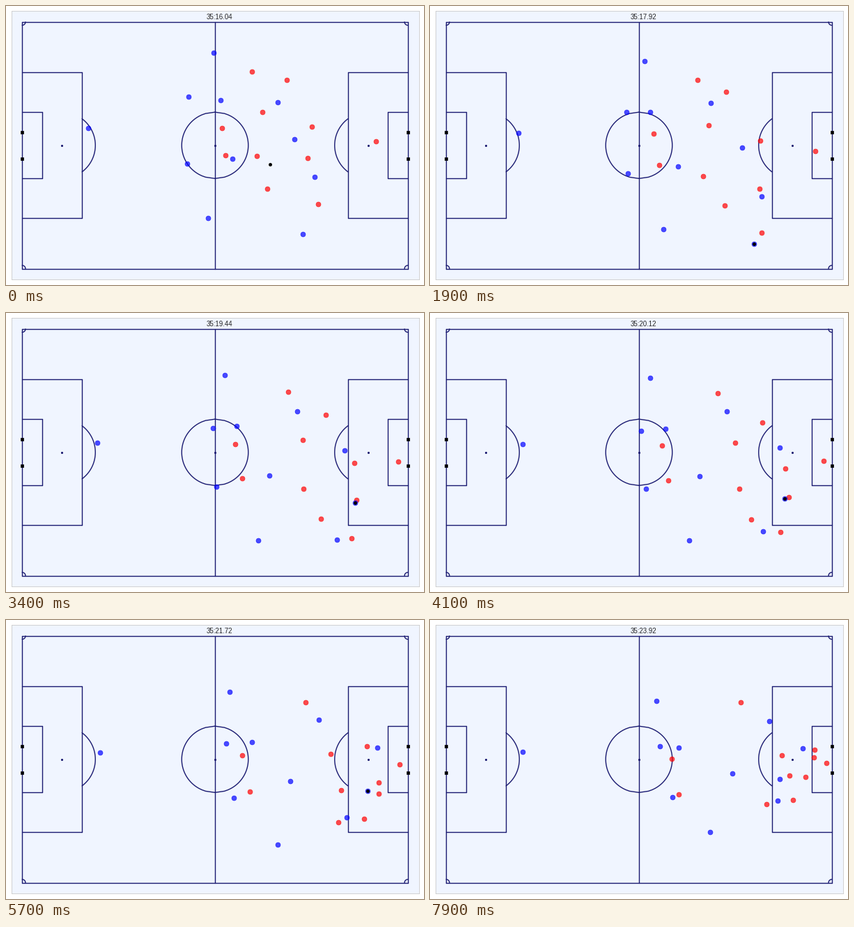
Write a matplotlib script that moves like this. It is 600 by 400 pixels and loops after 8 s.

```python
import numpy as np
import matplotlib.pyplot as plt
from matplotlib.animation import FuncAnimation

plt.rcParams["font.family"] = "Liberation Sans"
plt.rcParams["lines.solid_capstyle"] = "round"

W, H, DPI = 600, 400, 50
MARGIN, LIFT = 7.5, 0.25                      # pixels
HALF_L, HALF_W, BORDER = 53.0, 34.0, 3.0      # metres
SX = (W / 2 - MARGIN) / (HALF_L + BORDER)     # pixels per metre
SY = (H / 2 - MARGIN) / (HALF_W + BORDER)
CENTRE = np.array([W / 2 + 0.5, H / 2 + 0.25])
YARD = 0.9144
LINE, GRASS = "midnightblue", "#f0f5ff"

FRAMES, STEP_MS = 80, 100
RATE = 25                                     # tracking samples per second
START = 16.04                                 # seconds past minute 35
END = 7.88                                    # time of the last sample


# ---------- pitch ----------
fig = plt.figure(figsize=(W / DPI, H / DPI), dpi=DPI, facecolor="white")
ax = fig.add_axes([MARGIN / W, (MARGIN + LIFT) / H, 1 - 2 * MARGIN / W, 1 - 2 * MARGIN / H])
ax.set_facecolor(GRASS)
ax.set(xlim=(-HALF_L - BORDER, HALF_L + BORDER),
       ylim=(-HALF_W - BORDER, HALF_W + BORDER), xticks=[], yticks=[])
for spine in ax.spines.values():
    spine.set(color="0.8", linewidth=1.25)


def line(x, y):
    ax.plot(x, y, color=LINE, linewidth=2)


def spot(x):
    ax.scatter(x, 0, marker="o", facecolor=LINE, linewidth=0, s=20)


def arc(radius, lo, hi):
    y = np.linspace(lo, hi, 50)
    return np.sqrt(np.maximum(radius ** 2 - y ** 2, 0)), y


def box(side, depth, width):
    goal, front, w = side * HALF_L, side * (HALF_L - depth), width / 2
    line([goal, front], [-w, -w])
    line([goal, front], [w, w])
    line([front, front], [-w, w])


def draw_pitch():
    line([0, 0], [-HALF_W, HALF_W])
    spot(0)
    cx, cy = arc(10 * YARD, -10 * YARD, 10 * YARD)
    line(cx, cy)
    line(-cx, cy)
    dx, dy = arc(10 * YARD, -8 * YARD, 8 * YARD)
    kx, ky = arc(YARD, 0, YARD)
    for s in (-1, 1):
        line([-HALF_L, HALF_L], [s * HALF_W, s * HALF_W])
        line([s * HALF_L, s * HALF_L], [-HALF_W, HALF_W])
        ax.plot([s * HALF_L] * 2, [-4 * YARD, 4 * YARD], "ks", markersize=6)
        box(s, 6 * YARD, 20 * YARD)
        box(s, 18 * YARD, 44 * YARD)
        spot(s * (HALF_L - 12 * YARD))
        line(s * (HALF_L - kx), ky - HALF_W)
        line(s * (HALF_L - kx), HALF_W - ky)
        line(s * (HALF_L - 12 * YARD - dx), dy)


# ---------- motion (stage pixels) ----------
teams = {"r": [], "b": []}


def run(team, *points):
    """A player's smooth run: one polynomial through points evenly spaced in time."""
    u = np.linspace(-1, 1, len(points))
    px, py = np.polyfit(u, np.array(points, float), len(points) - 1).T

    def at(t):
        s = 2 * t / END - 1
        return np.array([np.polyval(px, s), np.polyval(py, s)])
    teams[team].append(at)
    return at


run("r", (354, 95), (412, 115), (447, 119))
run("r", (404, 107), (441, 134.5), (508, 175.5), (552, 198))
run("r", (369, 152.5), (436, 186), (506, 194.5))
run("r", (440, 174), (487.5, 204.5), (529, 233), (569.5, 206))
run("r", (532, 194.5), (565, 213), (552.5, 187))
run("r", (310, 176), (332.5, 190), (347, 200))
run("r", (316, 215), (342, 240), (358, 251))
run("r", (361, 216), (409, 250), (472, 247.5), (517, 224))
run("r", (433.5, 219), (489, 268), (531, 254), (540, 226))
run("r", (376, 262), (460, 296), (484, 265))
run("r", (449, 284.5), (478, 326), (502.5, 317), (516, 281), (522, 259))

run("b", (299, 67.5), (316.5, 93), (326, 117))
run("b", (263, 131), (302, 169), (331, 182))
run("b", (309, 136), (323, 157.5), (350, 173), (358, 184))
run("b", (391, 138.5), (425, 141.5), (487.5, 146))
run("b", (119, 176), (133, 188), (134, 190))
run("b", (415, 192), (466.5, 201.5), (527, 185.5), (536, 185))
run("b", (261, 226), (309, 251.5), (349, 255))
run("b", (326, 220), (386, 234), (434, 221))
run("b", (291, 305), (371, 326.5), (402, 305))
striker = run("b", (443.5, 245), (478, 274), (508, 267.5), (519, 242), (503, 229))
winger = run("b", (427, 328), (466, 341), (478, 316), (491.5, 280), (499.5, 260))

KICK_OFF, GOAL_LINE = np.array([379, 227]), np.array([579, 173])
RECEIVE, CROSS, CONTROL, SHOT, OUT = 1.45, 1.9, 2.75, 5.95, 6.81


def ball_at(t):
    """Pass out wide, pass inside, dribble, then a shot over the goal line."""
    def roll(a, b, t0, t1):
        return a + (b - a) * (t - t0) / (t1 - t0)

    if t < RECEIVE:
        return roll(KICK_OFF, winger(RECEIVE), 0, RECEIVE)
    if t < CROSS:
        return winger(t)
    if t < CONTROL:
        return roll(winger(CROSS), striker(CONTROL), CROSS, CONTROL)
    if t < SHOT:
        return striker(t)
    if t < OUT:
        return roll(striker(SHOT), GOAL_LINE, SHOT, OUT)
    return np.array([np.nan, np.nan])


def place(artist, points):
    x, y = (np.array(points) - CENTRE).T
    artist.set_data(x / SX, -y / SY)


# ---------- animation ----------
draw_pitch()
dots = {c: ax.plot([], [], c + "o", markersize=10, linewidth=0, alpha=0.7)[0] for c in teams}
ball, = ax.plot([], [], "ko", markersize=6, linewidth=0)
clock = ax.text(-2.4, HALF_W + 0.8, "", fontsize=14, color="0.15")


def update(n):
    t = n * STEP_MS * RATE // 1000 / RATE
    for c, members in teams.items():
        place(dots[c], [at(t) for at in members])
    place(ball, [ball_at(t)])
    clock.set_text(f"35:{START + t:05.2f}")
    return [*dots.values(), ball, clock]


anim = FuncAnimation(fig, update, frames=FRAMES, interval=STEP_MS, repeat=True, repeat_delay=0)
plt.show()
```
